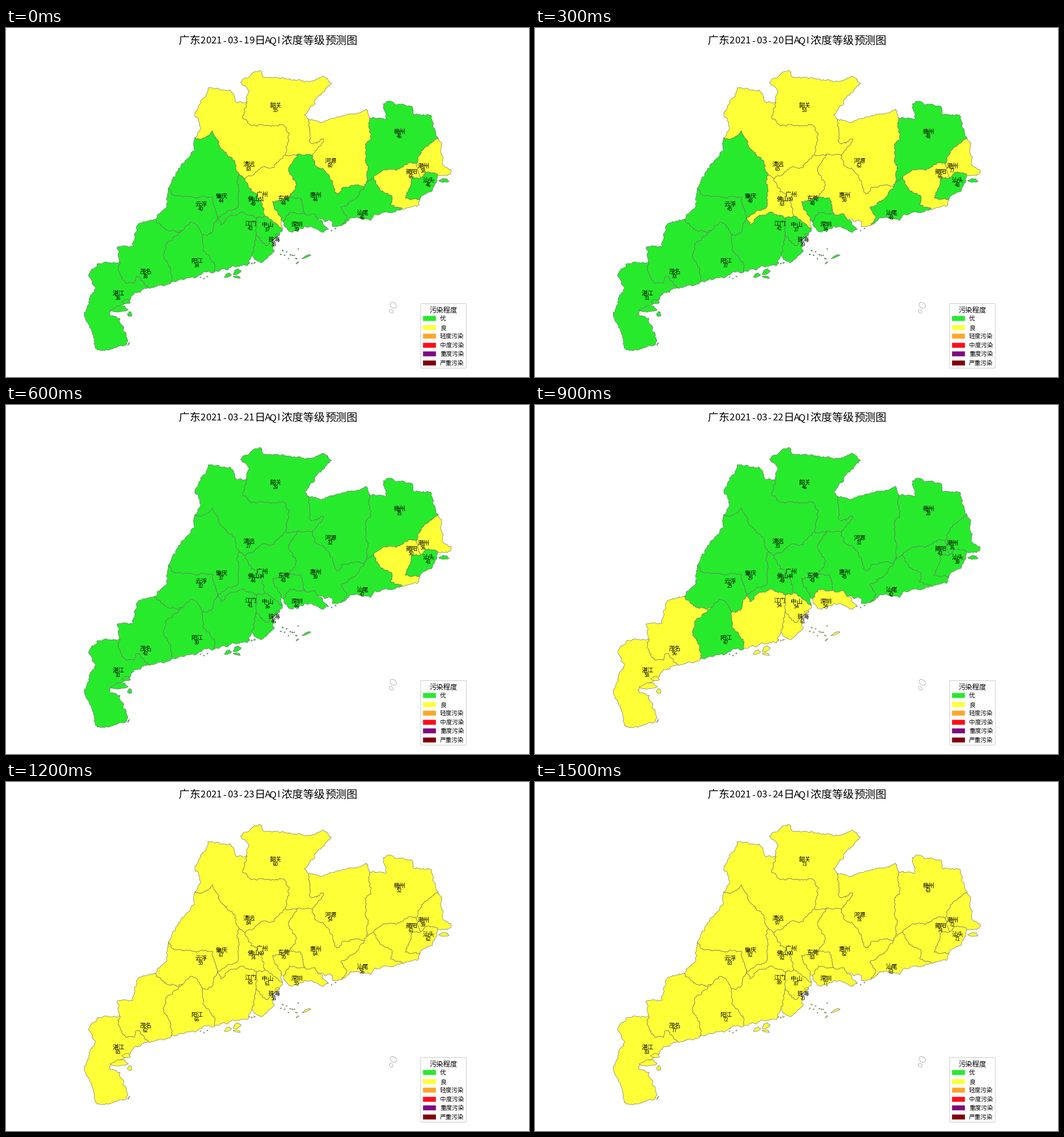
These frames come from a looping animation (917x611 px, 1.8 s). A matplotlib script:

```python
import math
import random

import matplotlib.pyplot as plt
from matplotlib.animation import FuncAnimation
from matplotlib.patches import Ellipse, FancyBboxPatch, Polygon, Rectangle

W, H, DPI = 917, 611, 128
FONT = "Noto Sans CJK JP"
LINE = "#6c6c6c"
GOOD, FAIR = "#28ea2c", "#ffff38"
LEVELS = [("优", GOOD), ("良", FAIR), ("轻度污染", "#ffa628"),
          ("中度污染", "#ff0d1b"), ("重度污染", "#7f0a80"), ("严重污染", "#800008")]


def px(size):
    return size * 72 / DPI


fig = plt.figure(figsize=(W / DPI, H / DPI), dpi=DPI, facecolor="white")
ax = fig.add_axes([0, 0, 1, 1])
ax.set(xlim=(0, W), ylim=(H, 0))
ax.axis("off")


def label(x, y, s, size, ha="center"):
    """Text whose optical middle sits at y."""
    return ax.text(x, y + 0.38 * size, s, fontsize=px(size), family=FONT,
                   ha=ha, va="baseline", color="black", zorder=5)


def grid_text(cx, y, s, size):
    """Set text on a grid where Latin characters take half a cell."""
    steps = [size / 2 if c.isascii() else size for c in s]
    x = cx - sum(steps) / 2
    cells = []
    for c, step in zip(s, steps):
        cells.append(label(x + step / 2, y, c, size * 0.88 if c.isascii() else size))
        x += step
    return cells


# Junctions where borders meet
NODES = dict(
    A=(331, 192), B=(422, 129), C=(531, 160), D=(638, 157), E=(758, 194),
    F=(757, 258), G=(719, 238), H=(727, 262), I=(726, 299), J=(695, 317),
    K=(645, 263), L=(632, 270), N=(628, 279), O=(588, 346), P=(546, 334),
    Q=(525, 327), R=(487, 340), S=(497, 297), T=(482, 335), U=(485, 351),
    V=(454, 329), W=(419, 264), X=(490, 222), Y=(512, 221), Z=(537, 223),
    a=(409, 256), b=(371, 331), d=(440, 332), e=(285, 280), f=(261, 335),
    g=(309, 355), h=(345, 362), i=(289, 446), j=(366, 427), k=(431, 398),
    l=(439, 362), m=(467, 373), n=(199, 409), o=(250, 455), p=(160, 564))
edges = {}
cities = []


def rough(p, q, rng):
    """Midpoint displacement from p up to, but not including, q."""
    dx, dy = q[0] - p[0], q[1] - p[1]
    size = math.hypot(dx, dy)
    if size < 3.5:
        return [p]
    k = rng.uniform(-1, 1) * min(0.3, 2 / size)
    mid = ((p[0] + q[0]) / 2 - k * dy, (p[1] + q[1]) / 2 + k * dx)
    return rough(p, mid, rng) + rough(mid, q, rng)


def edge(key, *xy):
    """Ragged border between two junctions through a few bends."""
    pts = [NODES[key[0]], *zip(xy[::2], xy[1::2]), NODES[key[1]]]
    rng = random.Random(key)
    line = []
    for p, q in zip(pts, pts[1:]):
        line += rough(p, q, rng)
    edges[key] = line + [pts[-1]]


def ring(nodes):
    out = []
    for p, q in zip(nodes, nodes[1:] + nodes[0]):
        if p + q not in edges and q + p not in edges:
            edge(p + q)
        part = edges[p + q] if p + q in edges else edges[q + p][::-1]
        out += part[:-1]
    return out


def shape(pts, z=2):
    return ax.add_patch(Polygon(pts, closed=True, facecolor=GOOD, edgecolor=LINE,
                                linewidth=px(0.65), joinstyle="round", zorder=z))


def city(name, x, y, nodes, *values):
    label(x, y, name, 10.6)
    text = label(x - 0.5, y + 9.2, "", 8.6)
    cities.append((text, values, [shape(ring(nodes))]))
    return cities[-1][2]


def isle(group, x, y, w, h, tilt=0, seed=1):
    rng = random.Random(seed)
    c, s = math.cos(math.radians(tilt)), math.sin(math.radians(tilt))
    pts = []
    for n in range(14):
        t, r = n * math.pi / 7, rng.uniform(0.36, 0.58)
        u, v = r * w * math.cos(t), r * h * math.sin(t)
        pts.append((x + u * c - v * s, y + u * s + v * c))
    group.append(shape(pts, 3))


def islets(group, x, y, w, h, count, size=2):
    rng = random.Random(count)
    for n in range(count):
        isle(group, x + w * ((n + 0.5) / count - 0.5), y + h * rng.uniform(-0.5, 0.5),
             size * rng.uniform(0.8, 1.8), size, rng.uniform(-60, 60), n)


# Coast and outer border, clockwise from the north-west
edge("AB", 341, 174, 331, 152, 347, 122, 354, 105, 392, 108, 405, 131)
edge("BC", 424, 108, 411, 95, 444, 74, 453, 86, 530, 93, 556, 84, 571, 97, 541, 130, 523, 152)
edge("CD", 552, 166, 595, 153, 632, 142)
edge("DE", 664, 160, 661, 133, 671, 128, 713, 139, 716, 152, 745, 153, 748, 172)
edge("EF", 763, 200, 766, 240, 780, 248, 779, 256)
edge("FI", 748, 285)
edge("IJ", 722, 312)
edge("JO", 645, 327, 640, 337, 608, 332)
edge("OP", 572, 347, 570, 338)
edge("PR", 563, 349, 557, 358, 525, 347, 512, 357, 496, 356)
edge("mk", 470, 392, 446, 411)
edge("kj", 424, 416, 385, 423)
edge("ji", 350, 427, 330, 438)
edge("op", 222, 468, 217, 477, 183, 496, 182, 503, 200, 508, 213, 545, 208, 556, 172, 565)
edge("pn", 155, 545, 137, 498, 157, 456, 145, 432, 162, 412)
edge("nf", 196, 383, 222, 383, 231, 345)
edge("fe", 282, 313)
edge("eA", 307, 239, 330, 215)
# Inner borders
edge("BX", 415, 158, 427, 169, 487, 170, 497, 185)
edge("CZ", 533, 200, 545, 202, 557, 194, 553, 204)
edge("ZN", 541, 240, 563, 255, 580, 291, 590, 279, 615, 275)
edge("DL", 640, 195, 630, 205)
edge("EG", 728, 215)
edge("GK", 708, 236, 690, 247, 662, 248)
edge("FH", 740, 252)
edge("HI", 712, 263, 700, 298)
edge("JK", 674, 309, 677, 296, 655, 283)
edge("NO", 613, 299, 587, 315, 597, 333)
edge("YS", 495, 245, 508, 272)
edge("SQ", 517, 298)
edge("QP", 542, 326)
edge("QR", 497, 322)
edge("ST", 468, 303)
edge("VW", 441, 294, 429, 287)
edge("WX", 452, 243, 470, 245)
edge("Aa", 343, 195, 362, 180, 378, 212, 397, 230)
edge("ab", 405, 270, 407, 312)
edge("eb", 297, 294, 362, 296)
edge("bd", 377, 345, 384, 336, 415, 322)
edge("fg", 285, 355)
edge("gh", 324, 340, 335, 345)
edge("hb", 360, 360)
edge("gi", 280, 378, 277, 400, 286, 419)
edge("hj", 345, 388, 365, 410)
edge("lm", 456, 381)
edge("no", 197, 425, 210, 447, 225, 447, 230, 435)

# Label position, outline and one index per day
city("韶关", 473, 135, "BCZYX", 55, 53, 29, 46, 60, 73)
city("清远", 426, 238, "ABXWa", 83, 65, 27, 33, 84, 97)
city("河源", 569, 232, "CDLNZ", 60, 62, 32, 31, 54, 78)
city("梅州", 690, 181, "DEGKL", 46, 48, 35, 28, 52, 63)
city("潮州", 732, 241, "EFHG", 58, 77, 56, 36, 59, 72)
city("揭阳", 711, 251, "GHIJK", 66, 66, 50, 43, 61, 74)
shantou = city("汕头", 741, 266, "FIH", 46, 48, 41, 39, 62, 71)
city("汕尾", 625, 323, "KJONL", 46, 44, 47, 42, 56, 63)
huizhou = city("惠州", 543, 292, "YZNOPQS", 44, 58, 39, 45, 64, 82)
city("东莞", 487, 298, "SQRT", 44, 48, 43, 43, 70, 83)
city("广州", 449, 291, "XYSTUVW", 51, 59, 34, 44, 69, 90)
city("佛山", 434, 298.5, "aWVdb", 49, 63, 44, 49, 74, 92)
city("肇庆", 378, 294, "Aabe", 44, 49, 37, 29, 67, 92)
city("云浮", 342, 308, "ebhgf", 40, 45, 32, 25, 55, 83)
jiangmen = city("江门", 429, 342, "hbdlkj", 42, 42, 41, 54, 65, 89)
city("中山", 459, 343.5, "dVUml", 37, 37, 36, 54, 61, 87)
zhuhai = city("珠海", 470, 370, "lmk", 38, 39, 46, 61, 58, 70)
city("深圳", 510, 343, "QPR", 39, 34, 44, 54, 55, 77)
yangjiang = city("阳江", 335, 407, "ghji", 34, 37, 39, 47, 66, 72)
city("茂名", 245, 425.5, "fgion", 38, 33, 42, 56, 62, 77)
zhanjiang = city("湛江", 197, 464, "nop", 36, 31, 31, 58, 65, 83)

# Islands
isle(zhanjiang, 199, 492, 31, 11, -5)
isle(zhanjiang, 217, 501, 8, 9)
isle(zhanjiang, 211, 479, 15, 8)
isle(zhanjiang, 215, 553, 6, 1.5, -60)
isle(shantou, 768, 267, 18, 7)
isle(jiangmen, 389, 433, 13, 7, -25)
isle(jiangmen, 405, 427, 15, 9, -30)
isle(jiangmen, 405, 436, 13, 4, 10)
isle(zhuhai, 527, 400, 17, 3.5, -25)
isle(zhuhai, 511, 411, 6, 2, -40)
isle(zhuhai, 476, 362, 8, 4)
islets(zhuhai, 497, 395, 34, 18, 10)
islets(jiangmen, 431, 412, 14, 2, 3)
islets(yangjiang, 347, 438, 18, 6, 3, 1.5)
islets(huizhou, 571, 354, 20, 6, 3, 1.5)
for x, y, w, h in [(679, 485.5, 12, 9), (675.5, 496, 7.5, 5.5)]:
    ax.add_patch(Ellipse((x, y), w, h, angle=40, fill=False, ec="#9a9a9a", lw=px(0.7)))

# Legend
ax.add_patch(FancyBboxPatch((729, 484.5), 76, 109, boxstyle="round,pad=2,rounding_size=2.2",
                            fc="white", ec="#cccccc", lw=px(1)))
label(767, 493, "污染程度", 12.3)
for row, (name, color) in enumerate(LEVELS):
    y = 508.4 + 15.5 * row
    ax.add_patch(Rectangle((731, y - 4), 21.5, 8, fc=color, ec=color, lw=px(0.6), zorder=3))
    label(761, y, name, 10.5, ha="left")


def headline(day):
    return f"广东2021-03-{19 + day}日AQI浓度等级预测图"


title = grid_text(459, 21, headline(0), 19)


def draw(day):
    for cell, c in zip(title, headline(day)):
        cell.set_text(c)
    for text, values, shapes in cities:
        text.set_text(str(values[day]))
        for s in shapes:
            s.set_facecolor(FAIR if values[day] >= 50 else GOOD)
    return []


anim = FuncAnimation(fig, draw, frames=6, interval=300, repeat=True, repeat_delay=0)
plt.show()
```
